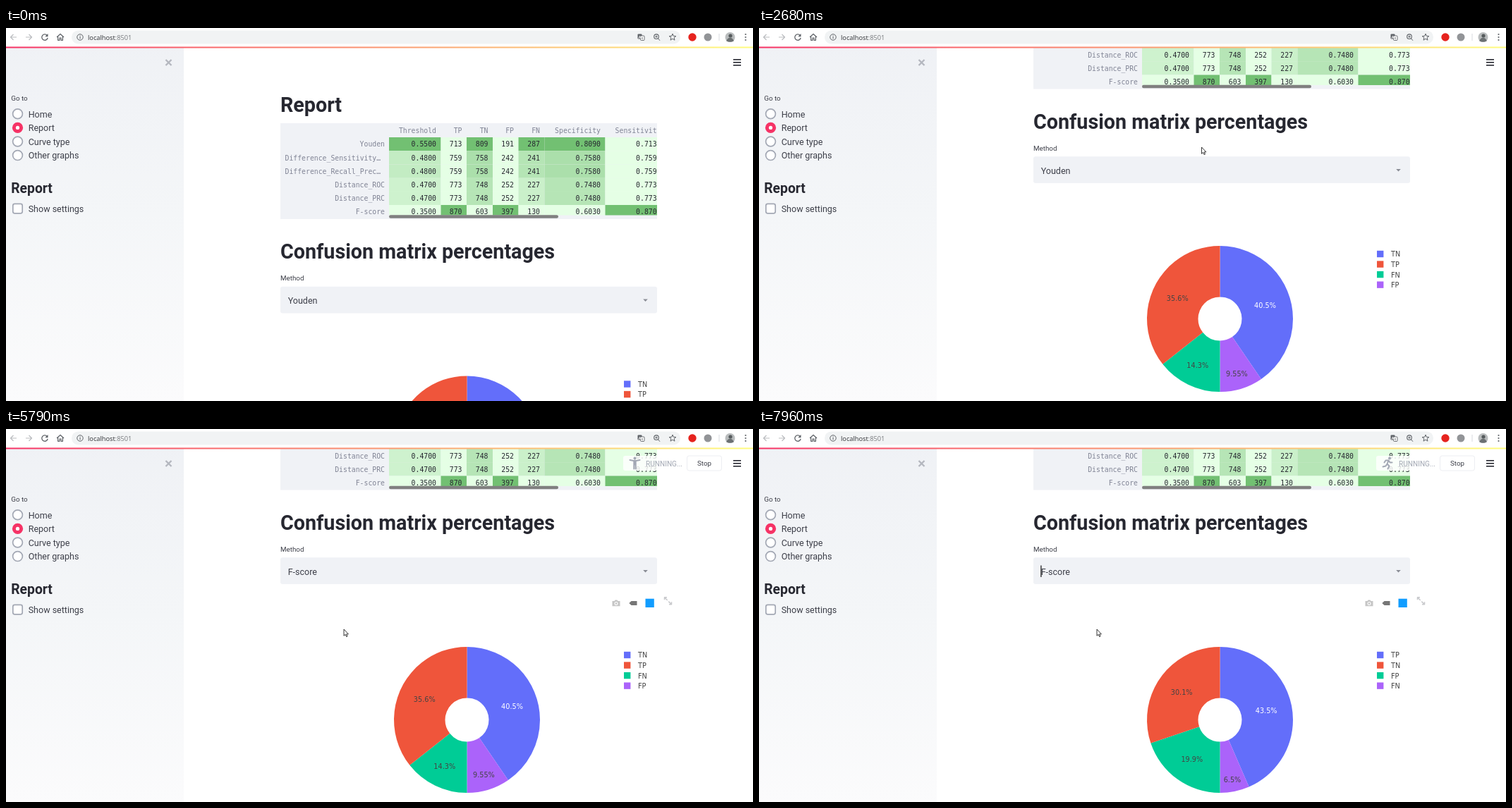
An HTML page with a canvas that plays this animation: 1059 by 529 pixels, repeating every 8000 ms.

```html
<!DOCTYPE html>
<html lang="en">
<head>
<meta charset="utf-8">
<title>Report</title>
<style>
  html, body { margin: 0; width: 100%; height: 100%; overflow: hidden; background: #fff; }
  canvas { display: block; }
</style>
</head>
<body>
<canvas id="stage" width="1059" height="529"></canvas>
<script>
const ctx = document.getElementById('stage').getContext('2d');
const LOOP = 8000, PINK = '#f63366', INK = '#262730', SOFT = '#3d3f49', PANEL = '#f0f2f6', GREY = '#a3a8b4';
const SANS = '12.5px Roboto, sans-serif', BOLD = 'bold 12.5px Roboto, sans-serif';
const LABEL = '9.8px Roboto, sans-serif', H1 = 'bold 28.7px Roboto, sans-serif';
const MONO = '9.8px "DejaVu Sans Mono", monospace', CHART = '9.7px "DejaVu Sans", sans-serif';

const METHODS = ['Youden', 'F-score', 'Distance_ROC', 'Distance_PRC',
  'Difference_Sensitivity_Specificity', 'Difference_Recall_Precision'];
const ROWS = [['Youden', .55, 713, 809], ['Difference_Sensitivity…', .48, 759, 758],
  ['Difference_Recall_Prec…', .48, 759, 758], ['Distance_ROC', .47, 773, 748],
  ['Distance_PRC', .47, 773, 748], ['F-score', .35, 870, 603]];
const EDGES = [543, 616.5, 653, 690, 726.5, 763.5, 849.5, 935];
const COLUMNS = [
  ['Threshold', r => r[1]], ['TP', r => r[2]], ['TN', r => r[3]], ['FP', r => 1000 - r[3]],
  ['FN', r => 1000 - r[2]], ['Specificity', r => r[3] / 1000], ['Sensitivity', r => r[2] / 1000]];

// Slices run clockwise: share, colour index, label, label radius
const PIES = [
  { legend: ['TN', 'TP', 'FN', 'FP'], slices: [[.4045, 0, '40.5%', 67], [.0955, 3, '9.55%', 81],
    [.1435, 2, '14.3%', 73], [.3565, 1, '35.6%', 67]] },
  { legend: ['TP', 'TN', 'FP', 'FN'], slices: [[.435, 0, '43.5%', 67], [.065, 3, '6.5%', 86],
    [.1985, 2, '19.9%', 68], [.3015, 1, '30.1%', 67]] }];
const HUES = ['#636efa', '#ef553b', '#00cc96', '#ab63fa'];

// Held positions: time, then values
const SCROLL = [[0, 0], [1620, 34], [1720, 84], [1820, 124.2], [1940, 166], [2050, 184.5]];
const POINTER = [[400, 960, 471], [520, 957.5, 421], [660, 957.5, 420], [1400, 957, 418],
  [2290, 930, 396], [2390, 835, 316], [2490, 730, 236], [2590, 655, 185], [2680, 627.5, 169],
  [2930, 624.5, 178], [3040, 621.5, 197.5], [3920, 596, 206], [4040, 556, 226], [4160, 518, 248],
  [4280, 495, 264], [4380, 488, 284], [4490, 484, 300], [4580, 481, 297], [4690, 479, 284]];
const CLICKS = [[940, 1080], [3270, 3510], [4800, 5020]];
const OPEN = 3700, PICK = 5350, RERUN = 5500, STALE = 6140, FRESH = 7840;

const held = (keys, t) => keys.filter(k => k[0] <= t).pop();

function text(s, x, y, font, color = INK, align = 'left') {
  ctx.font = font; ctx.fillStyle = color; ctx.textAlign = align;
  ctx.fillText(s, x, y);
}
function rect(x, y, w, h, fill, radius = 0, stroke, width = 1) {
  ctx.beginPath(); ctx.roundRect(x, y, w, h, radius);
  paint(fill, stroke, width);
}
function circle(x, y, r, fill, stroke, width) {
  ctx.beginPath(); ctx.arc(x, y, r, 0, 7);
  paint(fill, stroke, width);
}
function shape(d, x, y, fill, stroke, width = 1) {
  const path = new Path2D(d);
  ctx.save(); ctx.translate(x, y); ctx.lineJoin = 'round';
  if (fill) { ctx.fillStyle = fill; ctx.fill(path); }
  if (stroke) { ctx.strokeStyle = stroke; ctx.lineWidth = width; ctx.stroke(path); }
  ctx.restore();
}
function paint(fill, stroke, width = 1) {
  if (fill) { ctx.fillStyle = fill; ctx.fill(); }
  if (stroke) { ctx.strokeStyle = stroke; ctx.lineWidth = width; ctx.stroke(); }
}
function gradient(x, y, ...stops) {
  const g = ctx.createLinearGradient(0, 0, x, y);
  stops.forEach((c, i) => g.addColorStop(i / (stops.length - 1), c));
  return g;
}
function clipped(x, y, w, h, draw) {
  ctx.save(); ctx.beginPath(); ctx.rect(x, y, w, h); ctx.clip();
  draw(); ctx.restore();
}

function browserBar() {
  const dark = '#5f6368';
  rect(0, 0, 1059, 26.5, '#fff');
  rect(93, 3.5, 863, 19, '#f1f3f4', 9.5);
  shape('M4.5 0H-4M0-4L-4 0 0 4', 10.5, 13, null, '#bbbdc0', 1.2);
  shape('M-4.5 0H4M0-4L4 0 0 4', 32.5, 13, null, '#bbbdc0', 1.2);
  shape('M3.2-2.6A4.2 4.2 0 1 0 4.1 1', 55, 13, null, dark, 1.3);
  shape('M4.5-5V-.8H.3Z', 55, 13, dark);
  shape('M-5 0L0-4.5 5 0M-3.4-1V4.3H-1V1H1V4.3H3.4V-1', 77, 13, null, dark, 1.2);
  circle(105, 13, 4.2, null, dark, 1);
  rect(104.5, 12.3, 1.1, 3, dark); rect(104.5, 10.4, 1.1, 1.1, dark);
  const url = '9.25px "Open Sans", sans-serif';
  text('localhost', 116, 16.5, url, '#303236');
  text(':8501', 116 + ctx.measureText('localhost').width, 16.5, url, '#777a7e');

  rect(895.5, 8.5, 6, 7, dark, 1); rect(899.5, 11, 5.5, 6.5, '#fff', 1, dark, .9);
  text('A', 896.4, 14.6, 'bold 6px Roboto, sans-serif', '#fff');
  text('x', 900.6, 16.2, '5.5px Roboto, sans-serif', dark);
  circle(922, 12.2, 3.3, null, dark, 1.1);
  shape('M2.4 1.8L5 4.8M-1.7-.8H1.7M0-2.5V.9', 922, 13, null, dark, 1);
  shape('M0-4.8L1.3-1.6 4.8-1.4 2.1.8 3 4.2 0 2.3-3 4.2-2.1.8-4.8-1.4-1.3-1.6Z', 945, 13, null, dark, 1);
  circle(973, 13, 5.7, '#e6231e');
  circle(995, 13, 5.5, '#929497');
  rect(1010.5, 8, 1, 10, '#dadce0');
  clipped(1019, 6, 15, 14, () => {
    circle(1026.5, 13, 7, '#b9bcbd');
    circle(1027, 11, 2.6, '#555a5c');
    shape('M-5.5 5.2Q-3 .8 0 .8T5.5 5.2Q0 8.4-5.5 5.2Z', 1026.5, 13, '#6b7072');
  });
  for (const y of [9, 13, 17]) circle(1048.5, y, 1.1, dark);
}

function sidebar() {
  rect(0, 28, 252, 501, gradient(0, 529, '#eff1f5', '#f4f6f8', '#fbfbfc'));
  shape('M-4-4L4 4M4-4L-4 4', 230.5, 49, null, '#b4b7bf', 2.4);
  text('Go to', 7.3, 102.5, LABEL, SOFT);
  ['Home', 'Report', 'Curve type', 'Other graphs'].forEach((name, i) => {
    const y = 121.8 + 19.6 * i;
    if (i === 1) { circle(16.5, y, 7.6, PINK); circle(16.5, y, 2.6, '#fff'); }
    else circle(16.5, y, 6.9, '#fff', GREY, 1.7);
    text(name, 31.7, y + 4.8, SANS, SOFT);
  });
  text('Report', 7.3, 234, 'bold 19.3px Roboto, sans-serif');
  rect(9.8, 249.4, 13.4, 13.4, '#fff', 2.5, GREY, 1.7);
  text('Show settings', 31.7, 261, SANS, SOFT);
}

function table() {
  rect(389, 135, 534, 136, PANEL);
  clipped(389, 135, 534, 130.5, () => {
    COLUMNS.forEach(([title, value], c) => {
      const values = ROWS.map(value), low = Math.min(...values), span = Math.max(...values) - low;
      const left = EDGES[c], right = EDGES[c + 1] - 6.5;
      text(title, right, 149.2, MONO, '#808495', 'right');
      values.forEach((v, r) => {
        const y = 155 + 19.2 * r, k = Math.max(0, ((v - low) / span - .5) * 2);
        rect(left, y, EDGES[c + 1] - left, 19.3, `rgb(${229 - 115 * k},${255 - 63 * k},${229 - 115 * k})`);
        text(v < 1 ? v.toFixed(4) : v, right, y + 13.4, MONO, INK, 'right');
      });
    });
    ROWS.forEach(([name], r) => {
      const long = name.endsWith('…');
      text(name, long ? 395.5 : 537, 168.4 + 19.2 * r, MONO, '#808495', long ? 'left' : 'right');
    });
  });
  rect(543, 265.2, 240, 4.6, '#808080', 2.3);
}

function modebar() {
  shape('M-5.5-3H-2.5L-1.5-4.5H1.5L2.5-3H5.5V4.3H-5.5Z', 865, 431.5, '#c6c6c6');
  circle(865, 432, 2.5, '#fff'); circle(865, 432, 1.4, '#c6c6c6');
  shape('M-5.7 0L-2.5-3H5.5V3H-2.5Z', 889, 431.5, '#767676');
  rect(906.5, 425.2, 12.3, 12.3, '#119dff');
}

function chart(t) {
  const { legend, slices } = PIES[t < FRESH ? 0 : 1], cx = 653.5, cy = 597;
  const fade = Math.min(1, Math.max(0, (t - STALE) / 1000));
  ctx.save();
  ctx.globalAlpha = t < FRESH ? 1 - .67 * fade ** 1.7 : 1;
  let from = -Math.PI / 2;
  for (const [share, hue, label, radius] of slices) {
    const to = from + share * 2 * Math.PI, mid = (from + to) / 2;
    ctx.beginPath();
    ctx.arc(cx, cy, 103.5, from, to); ctx.arc(cx, cy, 31, to, from, true);
    paint(HUES[hue]);
    text(label, cx + radius * Math.cos(mid), cy + radius * Math.sin(mid) + 4, CHART, hue ? '#444' : '#fff', 'center');
    from = to;
  }
  legend.forEach((name, i) => {
    const y = 505 + 14.55 * i;
    rect(876, y - 4.7, 9.4, 9.4, HUES[i]);
    text(name, 896, y + 3.9, CHART, '#444');
  });
  if (t >= PICK) modebar();
  ctx.restore();
  if (t >= PICK) shape('M-5-1.5V-5H-1.5M-5-5L-.8-.8M5 1.5V5H1.5M5 5L.8.8', 938.5, 428.3, null, '#c8c9cc', 1.5);
}

function page(t) {
  ctx.save();
  ctx.translate(0, -held(SCROLL, t)[1]);
  text('Report', 389, 119, H1);
  table();
  text('Confusion matrix percentages', 389, 327, H1);
  text('Method', 389, 358, LABEL, SOFT);
  const open = t >= OPEN && t < PICK;
  rect(389, 366.7, 534, 37.7, PANEL, 3);
  if (open) rect(389.7, 367.4, 532.6, 36.4, null, 3, PINK, 1.7);
  text(t < PICK ? 'Youden' : 'F-score', 399.7, 391, SANS, SOFT);
  shape('M-3.3-1.6H3.3L0 1.8Z', 906.5, 386.2, '#8a8d96');
  if (t >= OPEN && (t - OPEN) % 1060 < 530) rect(399.3, 378, 1.2, 16.5, '#111');
  chart(t);
  ctx.restore();
}

function menu(t) {
  if (t < OPEN || t >= PICK) return;
  ctx.save();
  ctx.globalAlpha = Math.min(1, (t - OPEN + 60) / 240);
  ctx.shadowColor = 'rgba(0,0,0,.28)'; ctx.shadowBlur = 12; ctx.shadowOffsetY = 3;
  rect(389, 226, 534, 203, '#fff', 3);
  ctx.shadowColor = 'transparent';
  const hovered = Math.max(0, Math.floor((held(POINTER, t)[2] - 232.5) / 31.8));
  rect(389, 232.3 + 31.8 * hovered, 534, 31.8, PANEL);
  METHODS.forEach((name, i) =>
    text(name, 401, 253 + 31.8 * i, i ? SANS : BOLD, i === 0 || i === hovered ? INK : '#9a9ca5'));
  ctx.restore();
}

function status(t) {
  if (t < RERUN) return;
  rect(875, 38, 90, 21, 'rgba(255,255,255,.82)', 3);
  const pose = Math.floor(t / 130) % 3;
  const limbs = [
    'M1-4L-1 1 3 3 2 8M-1 1L-3 5-7 6M1-4L-4-3-5 0M1-4L4-1 7-2',
    'M1-4L-1 1 2 4 0 8M-1 1L-3 4-7 5M1-4L-3-4-5-1M1-4L3-1 6-1',
    'M0-4V2M-7-4.5L-2-3.5H2L7-4.5M-1.2-3V8M1.2-3V8'][pose];
  circle(pose === 2 ? 891.5 : 894, 41.5, 2, GREY);
  ctx.lineCap = 'round';
  shape(limbs, 891.5, 48.5, null, GREY, 2);
  ctx.lineCap = 'butt';
  text('RUNNING...', 907, 53, '10.1px Roboto, sans-serif', GREY);
  rect(965.5, 38, 49, 21, '#fff', 3, '#eceef2');
  text('Stop', 990, 52, LABEL, SOFT, 'center');
}

function pointer(t) {
  const key = held(POINTER, t);
  if (!key) return;
  const [, x, y] = key;
  if (CLICKS.some(([down, up]) => t >= down && t < up)) circle(x, y, 8.2, 'rgba(255,255,0,.47)');
  if (t >= 3040 && t < 4040)
    shape('M-1.8-5.2H1.8M0-5.2V5.2M-1.8 5.2H1.8', x, y, null, '#222', 1);
  else if (t >= 4040 && t < PICK)
    shape('M-1 1Q0-.6 1 1V5.2L6 6.4Q7 6.8 6.8 8L5.8 13H.2L-3 8.6Q-3.2 7.2-1 8.4Z', x, y, '#fff', '#222', .9);
  else
    shape('M0 0V9.3L2.1 7.4 3.6 10.6 5 10 3.6 6.9H6.4Z', x, y, '#fff', '#222', .9);
}

function draw(now) {
  const t = now % LOOP;
  rect(0, 0, 1059, 529, '#fff');
  clipped(252, 28, 807, 501, () => page(t));
  menu(t);
  sidebar();
  status(t);
  for (const y of [44, 48, 52]) rect(1031, y, 11, 1.6, INK);
  browserBar();
  rect(0, 26.4, 1059, 2, gradient(1059, 0, PINK, '#fffd80'));
  pointer(t);
}

const start = performance.now();
(function tick() {
  draw(performance.now() - start);
  requestAnimationFrame(tick);
})();
</script>
</body>
</html>
```
